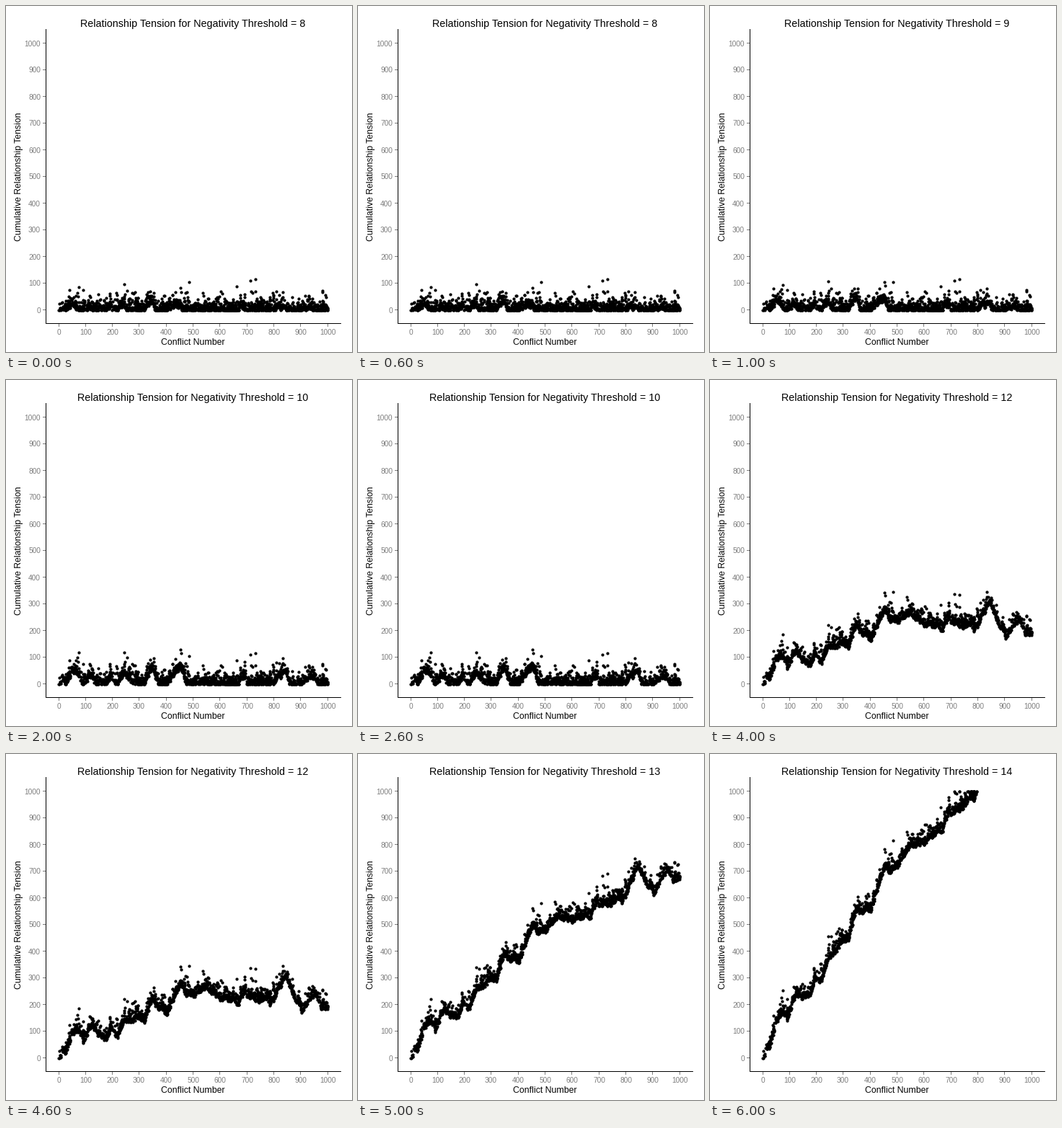
Recreate the animation shown at these times as a matplotlib script. Size 480x480 px, loop 7 s.

```python
import numpy as np
import matplotlib.pyplot as plt
from matplotlib.animation import FuncAnimation

SIZE, DPI = 480, 96
PT = 72 / DPI  # points per pixel
GREY = "#7f7f7f"
DRIFT = 0.49   # tension gained per conflict for each step of the threshold
LIMIT = 1000
plt.rcParams["font.family"] = "Liberation Sans"

# Turning points of tension at threshold 12: (conflict, tension)
TURNS = [(0, 0), (25, 2), (50, 80), (78, 72), (92, 45), (118, 105), (172, 45),
         (190, 85), (215, 65), (240, 118), (320, 138), (345, 198), (400, 148),
         (455, 258), (475, 212), (550, 240), (665, 190), (690, 222),
         (785, 192), (842, 290), (905, 160), (955, 225), (978, 180), (1000, 180)]
# The strongest single outbursts: (conflict, height)
BURSTS = [(75, 85), (244, 80), (485, 104), (662, 85), (713, 110), (732, 115)]

rng = np.random.default_rng(8)
conflicts = np.arange(1001)

rough = np.zeros(conflicts.size)
for i in conflicts[1:]:
    rough[i] = 0.85 * rough[i - 1] + rng.normal(0, 3.5)
wave = np.interp(conflicts, *zip(*TURNS)) + rough

dot_x = rng.integers(1, 1001, 1650)
dot_lift = rng.exponential(15, dot_x.size) - 6
keep = dot_lift < 76
dot_x = np.append(dot_x[keep], [c for c, _ in BURSTS])
dot_lift = np.append(dot_lift[keep], [h for _, h in BURSTS])


def to_x(conflict):
    return 73 + 0.3733 * conflict


def to_y(tension):
    return 421.5 - 0.37 * tension


def points(level):
    # Tension is a walk that bounces off zero and ends at the limit
    walk = wave + DRIFT * (level - 12) * conflicts
    walk -= np.minimum(np.minimum.accumulate(walk), 0)
    over = walk >= LIMIT
    end = np.argmax(over) if over.any() else LIMIT
    x, lift = dot_x[dot_x <= end], dot_lift[dot_x <= end]
    return to_x(x), to_y(np.clip(walk[x] + lift, 0, LIMIT))


fig = plt.figure(figsize=(SIZE / DPI, SIZE / DPI), dpi=DPI, facecolor="white")
ax = fig.add_axes([0, 0, 1, 1])
ax.set(xlim=(0, SIZE), ylim=(SIZE, 0))
ax.axis("off")


def line(xs, ys, color):
    ax.plot(xs, ys, color=color, lw=PT, snap=False, solid_capstyle="butt")


def label(x, y, text, px, color="black", ha="center", rotation=0):
    return ax.text(x, y, text, fontsize=px * PT, color=color, ha=ha,
                   va="baseline", rotation=rotation, rotation_mode="anchor")


for v in range(0, LIMIT + 1, 100):
    tx, ty = np.floor(to_x(v)) + 0.5, np.floor(to_y(v)) + 0.5
    line([tx, tx], [441, 445], GREY)
    line([51, 55], [ty, ty], GREY)
    label(tx, 456, str(v), 10.1, GREY)
    label(48, ty + 4, str(v), 10.1, GREY, ha="right")

line([55.5, 55.5], [32, 441], "black")
line([55, 465], [440.5, 440.5], "black")
label(259.5, 470, "Conflict Number", 12.3)
label(21, 236.5, "Cumulative Relationship Tension", 12.3, rotation=90)
title = label(259.5, 29, "", 14.2)
dots, = ax.plot([], [], "o", color="black", ms=4.2 * PT, mew=0, antialiased=False)


def update(i):
    level = 8 + i
    title.set_text(f"Relationship Tension for Negativity Threshold = {level}")
    dots.set_data(*points(level))
    return title, dots


anim = FuncAnimation(fig, update, frames=7, interval=1000, repeat=True,
                     repeat_delay=0, blit=False)
plt.show()
```
